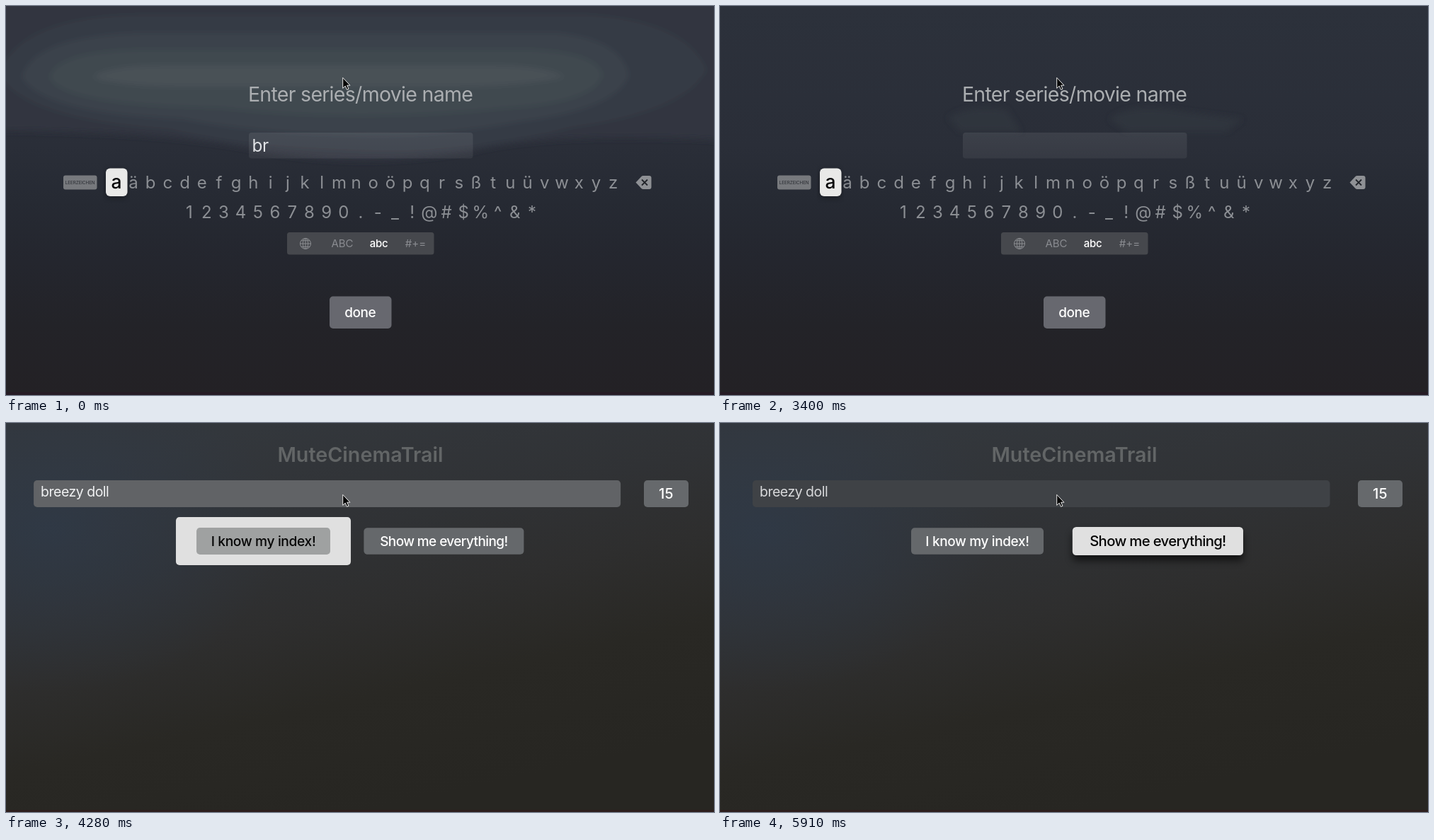
Write an HTML page that moves like this. It is 1000x550 px and loops after 8 s.

```html
<!DOCTYPE html>
<html lang="en">
<head>
<meta charset="utf-8">
<title>Search by remote</title>
<style>
  html, body { margin: 0; width: 100%; height: 100%; overflow: hidden; background: #24262d; }
  svg { display: block; width: 100vw; height: 100vh; }
  text { font-family: Inter, "Open Sans", sans-serif; white-space: pre; }
  .mid { text-anchor: middle; }
  .key { font-size: 24px; fill: #8c8f94; text-anchor: middle; }
  .mode { font-size: 15px; fill: #898b90; text-anchor: middle; }
  .label { font-size: 19px; font-weight: 500; fill: #fff; text-anchor: middle; letter-spacing: -.45px; }
</style>
</head>
<body>
<svg viewBox="0 0 1000 550" preserveAspectRatio="none">
  <defs>
    <linearGradient id="night" x2="0" y2="1">
      <stop offset="0" stop-color="#2c313b"/>
      <stop offset=".36" stop-color="#2a2e38"/>
      <stop offset=".5" stop-color="#262a33"/>
      <stop offset=".66" stop-color="#24262e"/>
      <stop offset=".82" stop-color="#232328"/>
      <stop offset="1" stop-color="#232125"/>
    </linearGradient>
    <linearGradient id="dusk" gradientUnits="userSpaceOnUse" x1="380" y1="0" x2="500" y2="550">
      <stop offset="0" stop-color="#33373c"/>
      <stop offset=".3" stop-color="#303235"/>
      <stop offset=".5" stop-color="#2e2e2e"/>
      <stop offset=".72" stop-color="#292824"/>
      <stop offset="1" stop-color="#272622"/>
    </linearGradient>
    <radialGradient id="blue">
      <stop offset="0" stop-color="#2f3a49" stop-opacity=".75"/>
      <stop offset="1" stop-color="#2f3a49" stop-opacity="0"/>
    </radialGradient>
    <linearGradient id="slot" x2="0" y2="1">
      <stop offset="0" stop-color="#fff" stop-opacity=".085"/>
      <stop offset="1" stop-color="#fff" stop-opacity=".06"/>
    </linearGradient>
    <filter id="soft" x="-10%" y="-20%" width="120%" height="140%"><feGaussianBlur stdDeviation="4"/></filter>
    <filter id="shade" x="-20%" y="-60%" width="140%" height="220%"><feGaussianBlur stdDeviation="5"/></filter>
  </defs>

  <g id="keyboard">
    <rect width="1000" height="550" fill="url(#night)"/>
    <g id="glow" filter="url(#soft)">
      <path fill="#30363f" d="M-20 -20H1020V190Q760 178 660 205Q500 232 360 205Q240 178-20 176Z"/>
      <path fill="#343b45" d="M-10 95Q20 14 190 12H820Q960 20 990 90Q960 150 800 172Q640 215 480 205Q330 200 230 175Q20 160-10 95Z"/>
      <path fill="#3a424b" d="M22 100Q40 42 190 38H780Q870 48 880 98Q862 146 730 163Q600 188 480 182Q350 180 250 160Q50 152 22 100Z"/>
      <path fill="#41494f" d="M62 100Q74 64 190 62H740Q836 66 842 98Q830 136 710 144Q500 166 300 144Q76 140 62 100Z"/>
      <path fill="#485156" d="M122 100Q150 84 220 84H690Q756 84 790 100Q740 112 640 114H240Q150 112 122 100Z"/>
    </g>
    <g id="ridge" filter="url(#soft)" fill="#33373f" opacity=".7">
      <path d="M322 158Q350 138 405 146L425 178H340Z"/>
      <path d="M550 160Q580 134 660 150L738 160 715 178H575Z"/>
    </g>
    <rect y="546" width="1000" height="4" fill="#261b25"/>
    <text class="mid" x="500.5" y="135" font-size="28.5" letter-spacing="-.7" fill="#abaeb1">Enter series/movie name</text>
    <rect x="343" y="179" width="316.5" height="36.5" rx="4" fill="url(#slot)"/>
    <text id="typed" x="347.5" y="206" font-size="24.3" letter-spacing="-.5" fill="#e1e3e6"></text>

    <rect x="81" y="239.500" width="47.500" height="20" rx="3" fill="#77797d"/>
    <text class="mid" x="104.700" y="251.800" font-size="6.2" fill="#25282e">LEERZEICHEN</text>
    <g id="keys"></g>
    <rect x="141" y="232" width="30.500" height="39" rx="6" fill="#000" opacity=".35" filter="url(#soft)"/>
    <rect x="141" y="229.500" width="30.500" height="39.500" rx="6" fill="#e9e9e8"/>
    <text class="mid" x="156" y="257.500" font-size="26.500" font-weight="500" fill="#08080a">a</text>
    <path d="M889.500 249.500L897.500 241Q898.500 240 900 240H908.500Q911.500 240 911.500 243V256Q911.500 259 908.500 259H900Q898.500 259 897.500 258Z" fill="#8f9195"/>
    <path d="M898 245.500l8 8m0-8l-8 8" stroke="#22252b" stroke-width="1.800" fill="none"/>

    <rect x="397" y="320" width="207.500" height="31.500" rx="3.500" fill="#46484d"/>
    <g fill="none" stroke="#8b8d91" stroke-width="1">
      <circle cx="423" cy="336" r="7.500"/>
      <ellipse cx="423" cy="336" rx="3.700" ry="7.500"/>
      <path d="M415.500 336h15M423 328.500v15M417 331.700h12M417 340.300h12"/>
    </g>
    <text class="mode" x="475" y="341.300">ABC</text>
    <text class="mode" x="526.500" y="341.300" style="fill:#fff;font-weight:500;letter-spacing:-.3px">abc</text>
    <text class="mode" x="578.500" y="341.300">#+=</text>
    <rect x="457" y="410.500" width="87.500" height="45.500" rx="5" fill="#67686f"/>
    <text class="label" x="500.300" y="440.300">done</text>
  </g>

  <g id="main">
    <rect width="1000" height="550" fill="url(#dusk)"/>
    <ellipse cx="60" cy="150" rx="330" ry="230" fill="url(#blue)"/>
    <rect y="547" width="1000" height="3" fill="#2d1e1d"/>
    <text class="mid" x="500.500" y="55" font-size="28.700" font-weight="600" fill="#626566">MuteCinemaTrail</text>
    <rect id="fieldShade" y="87" height="38" rx="5" fill="#000" filter="url(#shade)"/>
    <rect id="field" y="81" height="38" rx="5"/>
    <text id="query" y="104" font-size="19.500" letter-spacing="-.5">breezy doll</text>
    <rect x="901" y="81" width="63" height="38" rx="5" fill="#66696c"/>
    <text class="label" x="932.300" y="107.200" style="font-size:20px;letter-spacing:0">15</text>
    <g id="buttons"></g>
  </g>

  <path d="M475.700 101.300V116.300L479.200 113.100 481.500 118.300 484 117.200 481.700 112.200H486Z" fill="#050505" stroke="#e8e8e8" stroke-width="1" stroke-linejoin="round"/>
</svg>
<script>
const LOOP = 8000, PHRASE = "breezy doll", GROW = 0.067;
const $ = id => document.getElementById(id);
const clamp = v => Math.max(0, Math.min(1, v));
const span = (t, a, b) => clamp((t - a) / (b - a));
const smooth = u => u * u * (3 - 2 * u);
const lerp = (a, b, u) => a + (b - a) * u;
const mix = (a, b, u) => `rgb(${a.map((v, i) => Math.round(lerp(v, b[i], u)))})`;

function add(parent, tag, attrs, text) {
  const el = document.createElementNS("http://www.w3.org/2000/svg", tag);
  set(el, attrs);
  if (text) el.textContent = text;
  return parent.appendChild(el);
}
function set(el, attrs) {
  for (const k in attrs) el.setAttribute(k, attrs[k]);
}
function keyRow(chars, x, y) {
  [...chars].forEach((c, i) => add($("keys"), "text", { class: "key", x: x + 24.2 * i, y }, c));
}
keyRow("äbcdefghijklmnoöpqrsßtuüvwxyz", 180, 257.5);
keyRow("1234567890.-_!@#$%^&*", 259, 299.5);

// Moments at which each further character appears
const typing = [120, 470, 830, 1130, 1300, 1550, 1910, 2510, 2690];

function makeButton(label, cx, w, spacing) {
  const g = add($("buttons"), "g", {});
  const shade = add(g, "rect", { rx: 5, filter: "url(#shade)" });
  const plate = add(g, "rect", { rx: 5, fill: "#e0e0e0" });
  const face = add(g, "rect", { rx: 5 });
  const text = add(g, "text", { class: "label", y: 6.8, style: `letter-spacing:${spacing}px` }, label);
  const box = (el, w, h, dy = 0) => set(el, { x: -w / 2, y: dy - h / 2, width: w, height: h });
  // grow: share of the focus scale; on: has focus; pad: share of the plate's extra margin
  return (grow, on, pad) => {
    const s = 1 + GROW * grow;
    set(g, { transform: `translate(${cx} 167) scale(${s})` });
    box(shade, w, 37.5, 7);
    box(plate, w + 58 * pad, 37.5 + 30 * pad);
    box(face, w, 37.5);
    set(shade, { opacity: on ? 0.6 * grow : 0 });
    set(plate, { opacity: on ? 1 : 0 });
    set(face, { fill: on ? "#9fa1a1" : "#65686b", opacity: on ? pad : 1 });
    text.style.fill = on ? "#050505" : "#fff";
  };
}
const first = makeButton("I know my index!", 363.5, 187, -0.35);
const second = makeButton("Show me everything!", 618.4, 226, -0.6);

function drawField(t) {
  let grow, tint;
  if (t < 4280) {
    const u = span(t, 3840, 4040);
    grow = smooth(u);
    tint = 1 - (1 - u) ** 1.5;
  } else {
    const left = (1 - span(t, 4280, 4560)) ** 2;
    grow = 0.58 * left;
    tint = 0.21 * left;
  }
  const x = 46 - 12 * grow, w = 815.5 + 23.5 * grow;
  set($("field"), { x, width: w, fill: mix([63, 66, 70], [224, 224, 224], tint) });
  set($("fieldShade"), { x: x + 6, width: w - 12, opacity: t < 4280 ? 0.5 * tint : 0 });
  const lit = t >= 3840 && t < 4280;
  set($("query"), { x: x + 10, fill: lit ? "#050505" : mix([216, 217, 219], [255, 255, 255], tint * 3) });
}

function drawButtons(t) {
  const NEXT = 4620;
  if (t < 4280) first(0, false, 0);
  else if (t < NEXT) {
    const u = 1 - (1 - span(t, 4280, 4500)) ** 2;
    first(lerp(0.15, 1, u), true, 1 - u);
  } else first((1 - span(t, NEXT, 5030)) ** 2.8, false, 0);

  if (t < NEXT) second(0, false, 0);
  else {
    const u = span(t, NEXT, 4680);
    const press = t >= 5560 ? Math.sin(Math.PI * span(t, 5525, 5910)) : 0;
    second(lerp(0.15, 1, u) * (1 - press), true, 1 - u);
  }
}

function draw(t) {
  const leaving = t >= 3400;
  const count = 2 + typing.filter(m => t >= m).length;
  $("typed").textContent = leaving ? "" : PHRASE.slice(0, count);
  $("glow").style.display = leaving ? "none" : "";
  $("ridge").style.display = leaving ? "" : "none";
  const shown = smooth(span(t, 3400, 3820));
  set($("main"), { opacity: shown });
  $("main").style.display = shown ? "" : "none";
  drawField(t);
  drawButtons(t);
}

const start = performance.now();
function tick() {
  draw((performance.now() - start) % LOOP);
  requestAnimationFrame(tick);
}
tick();
</script>
</body>
</html>
```
